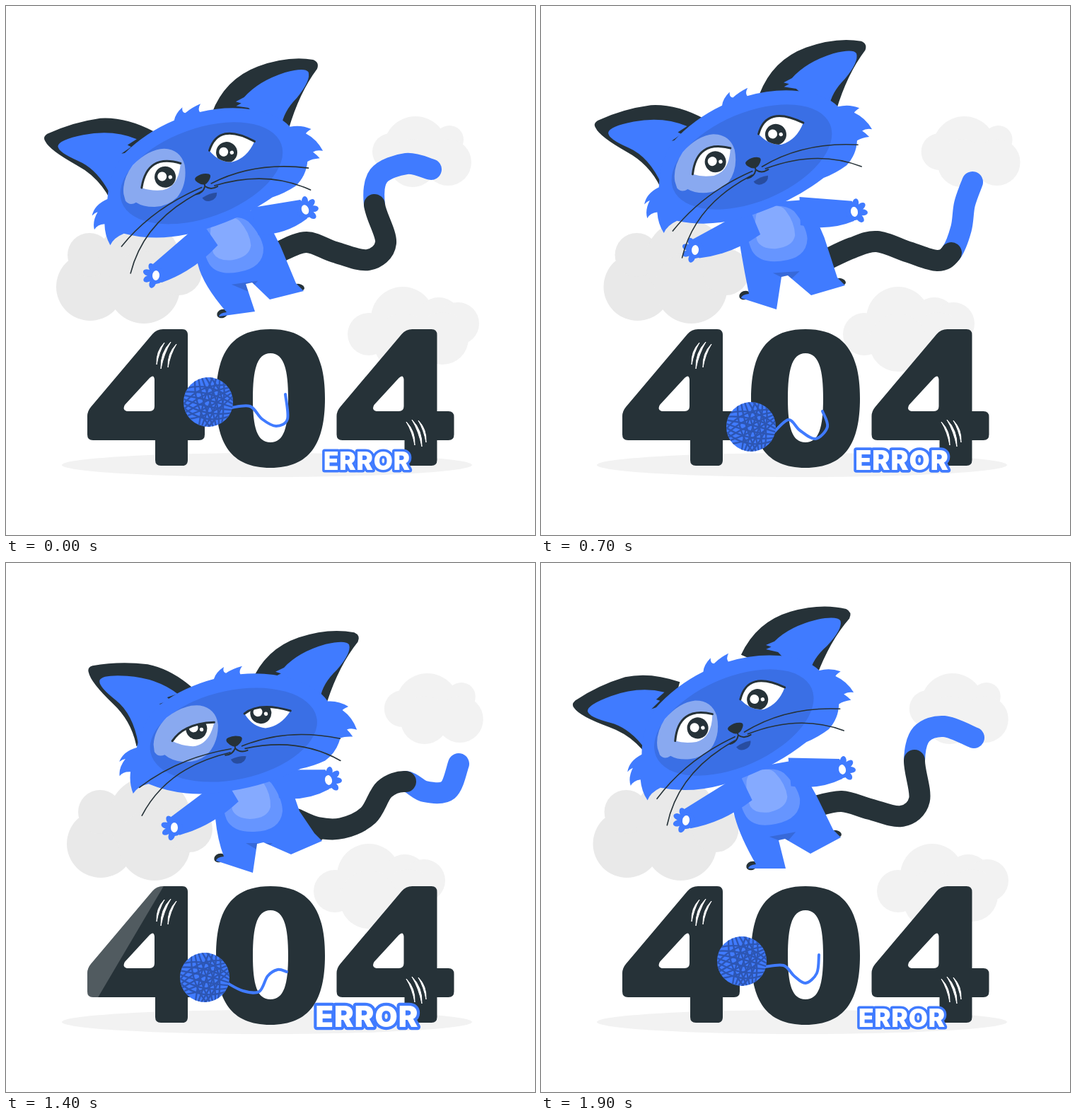
An HTML page for the animation above (2000 ms loop, 748 by 748 pixels).

```html
<!DOCTYPE html>
<html lang="en">
<head>
<meta charset="utf-8">
<title>404 error</title>
<style>
  html, body { margin: 0; height: 100%; overflow: hidden; background: #fff; }
  svg { display: block; width: 100%; height: 100%; }
  .dark { fill: #263238; }
  .blue { fill: #407bff; }
  .line { fill: none; stroke: #263238; stroke-linecap: round; stroke-linejoin: round; }
  .thick { stroke-width: 30; }
  .thread { stroke: #407bff; stroke-width: 4; }
  text { font: 900 35px Inter, "Liberation Sans", sans-serif; letter-spacing: .8px; text-anchor: middle;
    fill: #fff; stroke: #407bff; stroke-width: 7; stroke-linejoin: round; paint-order: stroke; }
</style>
</head>
<body>
<svg viewBox="0 0 748 748">
  <defs>
    <path id="four" clip-rule="evenodd" fill-rule="evenodd" d="M222 457H249Q257 457 257 465V573H273Q281 573 281 581V606Q281 614 273 614H257V642Q257 650 249 650H219Q211 650 211 642V614H123Q115 614 115 606V580Q115 573 120 567L207 464Q213 457 222 457ZM171 573H203Q210 573 210 566V528Q209 520 203 526L168 564Q164 571 171 573Z"/>
    <path id="zero" clip-rule="evenodd" fill-rule="evenodd" d="M374 457C430 457 451 492 451 555C451 618 430 653 374 653C318 653 297 618 297 555C297 492 318 457 374 457ZM374 491C355 491 349 514 349 555C349 596 355 617 374 617C393 617 399 596 399 555C399 514 393 491 374 491Z"/>
    <g id="hand">
      <circle class="blue" r="12"/>
      <g class="blue" id="fingers"></g>
      <ellipse rx="5" ry="7" fill="#fff"/>
    </g>
    <clipPath id="digitClip"><use href="#four"/><use href="#zero"/><use href="#four" x="352.5"/></clipPath>
    <clipPath id="bodyClip"><path id="bodyMask"/></clipPath>
    <clipPath id="eyeClip"><path id="eyeMask"/></clipPath>
    <clipPath id="ballClip"><circle r="35"/></clipPath>
  </defs>

  <ellipse cx="369" cy="649" rx="290" ry="17" fill="#f2f2f2"/>
  <g id="cloudLeft" fill="#e9e9e9"></g>
  <g id="cloudTop" fill="#f2f2f2"></g>
  <g id="cloudLow" fill="#f2f2f2"></g>

  <path id="tailTip" class="line thick" style="stroke:#407bff"/>
  <path id="tail" class="line thick"/>

  <ellipse id="toeL" class="dark" rx="8" ry="6"/>
  <ellipse id="toeR" class="dark" rx="8" ry="5"/>
  <path id="body" class="blue"/>
  <path id="crease" opacity=".15" clip-path="url(#bodyClip)"/>
  <g id="belly" fill="#fff" fill-opacity=".2">
    <path d="M-24-38Q12-44 26-30Q42-8 42 10Q39 38 2 39Q-28 40-37 22Q-46 0-38-26Q-33-37-24-38Z"/>
    <path d="M-18-39Q8-43 14-32Q26-14 25 4Q21 20-4 21Q-24 20-29 8Q-33-8-28-28Q-25-37-18-39Z"/>
  </g>
  <path id="armL" class="blue"/><use id="handL" href="#hand"/>
  <path id="armR" class="blue"/><use id="handR" href="#hand"/>

  <g id="head">
    <g id="earL">
      <path class="dark" d="M168 214Q163 178 138 152Q108 120 106 106Q104 99 112 97Q150 92 190 99Q225 108 256 140L205 195Z"/>
      <path class="blue" d="M171 212Q166 168 142 147Q118 126 121 118Q125 110 160 114Q202 119 230 143L215 147L219 151L203 156L217 158L205 195Z"/>
    </g>
    <g id="earR">
      <path class="dark" d="M340 134Q370 92 420 87Q465 83 498 98Q506 104 500 112Q467 138 439 184L400 175Z"/>
      <path class="blue" d="M430 178Q438 158 462 144Q488 125 487 113Q484 105 455 105Q415 107 390 124L377 127L384 131L376 133L392 140L410 168Z"/>
    </g>
    <path class="blue" d="M204 158Q242 136 286 130Q290 121 302 115Q299 122 304 124Q314 119 328 117Q322 123 324 128Q362 129 395 143Q430 158 442 181Q458 182 470 192Q463 194 461 196Q474 208 478 226Q470 222 464 224Q468 229 471 235Q460 233 453 235Q446 254 428 264Q410 270 392 271Q345 288 290 290Q225 294 176 266Q160 268 153 277Q149 262 153 246Q143 244 137 250Q137 238 148 227Q144 227 139 230Q146 216 166 213Q178 178 204 158Z"/>
    <ellipse rx="120" ry="63" transform="translate(304 212) rotate(-5)" opacity=".1"/>
    <path fill="#fff" opacity=".4" d="M190 212Q193 192 213 176Q240 160 262 165Q284 172 284 195Q281 222 262 236Q246 245 228 241Q212 237 204 228Q194 231 190 222Z"/>
    <path id="eyes" fill="#fff"/>
    <g clip-path="url(#eyeClip)"><g id="pupils">
      <g id="pupil"><circle class="dark" cx="252" cy="205" r="15"/><circle cx="248" cy="203" r="6.5" fill="#fff"/><circle cx="259" cy="207" r="2.7" fill="#fff"/></g>
      <use href="#pupil" x="93" y="-11"/>
    </g></g>
    <path id="lashes" class="line" stroke-width="3"/>
    <path class="dark" d="M296 215Q304 212 312 215Q318 217 313 223Q304 234 295 223Q290 217 296 215Z"/>
    <path class="line" stroke-width="2" d="M304 227V231Q299 240 289 239M304 231Q310 239 321 236"/>
    <path d="M296 246Q307 242 318 244Q316 253 306 253Q298 253 296 246Z" opacity=".3"/>
    <path id="whiskL" class="line" stroke-width="1.6" d="M298 231Q222 233 162 267M296 236Q205 244 160 307"/>
    <path id="whiskR" class="line" stroke-width="1.6" d="M314 229Q380 210 453 234M318 233Q395 225 450 265"/>
  </g>

  <g class="dark"><use href="#four"/><use href="#zero"/><use href="#four" x="352.5"/></g>
  <g clip-path="url(#digitClip)"><path id="glare" fill="#fff" opacity=".2" d="M65 450H-7L-131 660H-59Z"/></g>
  <g fill="#fff">
    <g id="scratch"><path d="M224 476Q212 488 213 507Q216 490 224 476Z M233 475Q218 490 219 513Q223 492 233 475Z M241 478Q228 491 229 511Q232 493 241 478Z" stroke="#fff"/></g>
    <use href="#scratch" transform="translate(807 110) scale(-1 1)"/>
  </g>

  <path id="thread" class="line thread"/>
  <g id="ball">
    <circle class="blue" r="35"/>
    <g id="strands" clip-path="url(#ballClip)" fill="none" stroke="#2d56b3" stroke-width="2.4"></g>
  </g>
  <g id="error"><text y="12.5">ERROR</text></g>
</svg>

<script>
const $ = id => document.getElementById(id);
const set = (id, name, value) => $(id).setAttribute(name, value);
const move = (id, value) => set(id, 'transform', value);

const LOOP = 2000;
const KEYS = [0, 400, 700, 1000, 1400, 1600, 1900];

// One value per key time.
const head = {
  x: [279, 304, 301, 313, 323, 300, 276],
  y: [246, 222, 223, 221, 253, 213, 235],
  tilt: [-15, 0, -17.6, -8, -7, -15, -18.7],
  earL: [-3, 0, 0, 0, 4, -40, -8],
  earR: [0, 0, 3, 3, -6, 37, 8],
  sway: [6.5, 0, 4.5, 4.5, 1, 7.5, 5],
  look: [-1, 0, -2, -2, -8, -11, -2],
  lid: [0, .15, 0, .1, 1, .3, 0]
};
const torso = {
  x: [321, 324, 334, 344, 349, 332, 323],
  y: [338, 321, 322, 318, 341, 303, 331],
  lean: [-8, 0, -4, -5, 0, -8, -10]
};
const hands = {
  lx: [212, 212, 218, 233, 238, 253, 205],
  ly: [381, 346, 345, 355, 374, 361, 364],
  la: [185, 180, 185, 185, 180, 118, 190],
  rx: [423, 433, 443, 450, 456, 427, 426],
  ry: [288, 292, 291, 282, 307, 312, 292],
  ra: [-20, -12, -10, -20, -12, 0, -12]
};
const feet = {
  lx1: [299, 272, 281, 299, 295, 306, 291],
  ly1: [439, 407, 413, 411, 421, 410, 432],
  lx2: [352, 325, 333, 354, 349, 362, 346],
  ly2: [432, 423, 429, 422, 438, 405, 432],
  cx: [346, 339, 347, 357, 362, 362, 343],
  cy: [393, 377, 383, 376, 397, 402, 392],
  rx1: [373, 372, 382, 401, 403, 365, 381],
  ry1: [415, 402, 409, 397, 412, 405, 411],
  rx2: [421, 420, 430, 445, 447, 412, 424],
  ry2: [403, 390, 395, 380, 393, 389, 388]
};
const yarn = {
  x: [286, 298, 297, 290, 281, 279, 284],
  y: [560, 581, 595, 595, 586, 578, 563]
};

// One row of x, y pairs per key time.
const tailRows = [
  [388, 347, 425, 334, 465, 348, 512, 359, 537, 335, 521, 281, 527, 240, 566, 223, 601, 231],
  [395, 345, 440, 326, 482, 344, 530, 366, 557, 358, 566, 334, 567, 285, 578, 251, 607, 238],
  [405, 358, 440, 342, 475, 333, 520, 348, 560, 360, 580, 349, 594, 315, 599, 280, 610, 249],
  [418, 353, 448, 343, 480, 308, 517, 296, 555, 317, 597, 322, 615, 312, 617, 270, 603, 222],
  [410, 362, 440, 374, 475, 375, 512, 357, 535, 320, 565, 309, 592, 323, 625, 321, 640, 284],
  [398, 325, 435, 335, 475, 340, 510, 328, 525, 290, 538, 272, 565, 267, 600, 275, 637, 279],
  [385, 345, 425, 337, 465, 348, 510, 358, 535, 335, 528, 279, 538, 242, 570, 231, 612, 247]
];
const threadRows = [
  [345, 566, 362, 584, 382, 594, 398, 584, 395, 549],
  [348, 577, 366, 574, 386, 594, 413, 578, 397, 556],
  [350, 585, 366, 600, 388, 612, 405, 595, 398, 573],
  [345, 589, 356, 612, 376, 621, 389, 597, 399, 582],
  [335, 605, 358, 606, 370, 584, 384, 575, 397, 578],
  [332, 594, 355, 602, 368, 580, 380, 571, 394, 571],
  [343, 569, 358, 584, 374, 594, 390, 580, 393, 554]
];

// Periodic cubic interpolation through the key times.
function tween(values, t) {
  const n = KEYS.length;
  const time = k => KEYS[(k + n) % n] + LOOP * Math.floor(k / n);
  const value = k => values[(k + n) % n];
  const slope = k => (value(k + 1) - value(k - 1)) / (time(k + 1) - time(k - 1));
  let k = n - 1;
  while (KEYS[k] > t) k--;
  const span = time(k + 1) - time(k), u = (t - time(k)) / span, v = 1 - u;
  return v * v * (1 + 2 * u) * value(k) + u * u * (3 - 2 * u) * value(k + 1)
    + span * u * v * (v * slope(k) - u * slope(k + 1));
}
const pose = (tracks, t) =>
  Object.fromEntries(Object.entries(tracks).map(([name, values]) => [name, tween(values, t)]));
function rowPoints(rows, t) {
  const points = [];
  for (let i = 0; i < rows[0].length; i += 2)
    points.push([0, 1].map(axis => tween(rows.map(row => row[i + axis]), t)));
  return points;
}

function segments(points, from, to) {
  const p = i => points[Math.max(0, Math.min(points.length - 1, i))];
  let d = 'M' + p(from);
  for (let i = from; i < to; i++) {
    const c1 = [0, 1].map(a => p(i)[a] + (p(i + 1)[a] - p(i - 1)[a]) / 6);
    const c2 = [0, 1].map(a => p(i + 1)[a] - (p(i + 2)[a] - p(i)[a]) / 6);
    d += `C${c1} ${c2} ${p(i + 1)}`;
  }
  return d;
}

function drawArm(side, shoulder, x, y, angle, flip) {
  const dx = x - shoulder[0], dy = y - shoulder[1], len = Math.hypot(dx, dy);
  set('arm' + side, 'd', `M-8 -18L${len - 4} -15Q${len + 8} 0 ${len} 13Q${len * .5} 29 -5 22Z`);
  move('arm' + side, `translate(${shoulder}) rotate(${Math.atan2(dy, dx) * 180 / Math.PI}) scale(1 ${flip})`);
  move('hand' + side, `translate(${x} ${y}) rotate(${angle})`);
}

function drawBody(t) {
  const b = pose(torso, t), h = pose(hands, t), f = pose(feet, t);
  const a = b.lean * Math.PI / 180, cos = Math.cos(a), sin = Math.sin(a);
  const at = (x, y) => [b.x + x * cos - y * sin, b.y + x * sin + y * cos];
  const d = `M${at(-41, -45)}Q${at(-56, -5)} ${at(-53, 20)}Q${at(-50, 50)} ${f.lx1 + 13} ${f.ly1 - 6}`
    + `Q${f.lx1 + 3} ${f.ly1 - 5} ${f.lx1 + 2} ${f.ly1}L${f.lx2} ${f.ly2}L${f.cx - 7} ${f.cy}L${f.cx + 2} ${f.cy - 2}`
    + `L${f.rx1} ${f.ry1}L${f.rx2} ${f.ry2}L${f.rx2 - 11} ${f.ry2 - 11}L${at(66, 10)}L${at(47, -45)}Z`;
  set('body', 'd', d);
  set('bodyMask', 'd', d);
  set('crease', 'd', `M${at(-10, 55)}L${at(28, 55)}L${at(12, 68)}Z`);
  move('belly', `translate(${b.x} ${b.y}) rotate(${b.lean})`);
  move('toeL', `translate(${f.lx1 + 7} ${f.ly1 - 4}) rotate(-20)`);
  move('toeR', `translate(${f.rx2 - 7} ${f.ry2 - 5}) rotate(10)`);
  drawArm('L', at(-37, -19), h.lx, h.ly, h.la, -1);
  drawArm('R', at(41, -31), h.rx, h.ry, h.ra, 1);
}

function drawHead(t) {
  const p = pose(head, t), drop = 22 * p.lid;
  move('head', `translate(${p.x} ${p.y}) rotate(${p.tilt}) translate(-304 -222)`);
  move('earL', `rotate(${p.earL} 205 180)`);
  move('earR', `rotate(${p.earR} 410 160)`);
  move('whiskL', `rotate(${-p.sway} 304 222)`);
  move('whiskR', `rotate(${p.sway * .6} 304 222)`);
  move('pupils', `translate(1 ${p.look})`);
  const topL = `M217 210Q237 ${165 + drop} 279 191`, topR = `M323 184Q346 ${148 + drop} 388 188`;
  const eyes = topL + 'Q268 222 245 221Q228 218 217 210Z' + topR + 'Q372 208 350 208Q332 204 323 184Z';
  set('eyes', 'd', eyes);
  set('eyeMask', 'd', eyes);
  set('lashes', 'd', topL + topR);
}

function draw(t) {
  const drift = 1 - Math.abs(t / 1000 - 1);
  move('cloudLeft', `translate(${25 * drift})`);
  move('cloudTop', `translate(${28 * drift})`);
  move('cloudLow', `translate(${-80 * drift})`);

  const tail = rowPoints(tailRows, t);
  set('tail', 'd', segments(tail, 0, 5));
  set('tailTip', 'd', segments(tail, 5, 8));
  drawBody(t);
  drawHead(t);

  const ball = pose(yarn, t);
  move('ball', `translate(${ball.x} ${ball.y})`);
  const thread = [[ball.x + 32, ball.y + 8], ...rowPoints(threadRows, t)];
  set('thread', 'd', segments(thread, 0, thread.length - 1));

  move('glare', `translate(${t < 1200 ? 1.4 * t - 88 : 1.4 * t - 1798})`);
  const pulse = ((1 + Math.cos((t - 450) * Math.PI / 500)) / 2) ** 1.3;
  move('error', `translate(510.5 ${643 - 2 * pulse}) scale(${1 + .195 * pulse})`);
}

const circles = list => list.map(([x, y, r]) => `<circle cx="${x}" cy="${y}" r="${r}"/>`).join('');
$('cloudLeft').innerHTML = circles([[119, 397, 48], [118, 352, 31], [188, 360, 58], [195, 398, 51], [244, 376, 33]]);
$('cloudTop').innerHTML = circles([[544, 206, 26], [579, 201, 45], [627, 189, 20], [575, 222, 34], [625, 221, 33]]);
$('cloudLow').innerHTML = circles([[513, 464, 30], [561, 442, 45], [612, 444, 32], [639, 449, 30], [617, 470, 37], [561, 476, 41]]);
$('fingers').innerHTML = [-72, -28, 14, 58].map(a =>
  `<ellipse cx="12" rx="7" ry="4.5" transform="rotate(${a})"/>`).join('');
$('strands').innerHTML = [[12, 6], [-28, 5], [72, 5], [105, 4]].map(([angle, count]) =>
  Array.from({ length: count }, (_, i) =>
    `<path transform="rotate(${angle})" d="M-36 ${i * 5 - 12}Q0 ${i * 13 - 30} 36 ${i * 4 - 8}"/>`).join('')).join('');

function frame() {
  draw(Math.floor(performance.now() / 100) * 100 % LOOP);
  requestAnimationFrame(frame);
}
frame();
</script>
</body>
</html>
```
